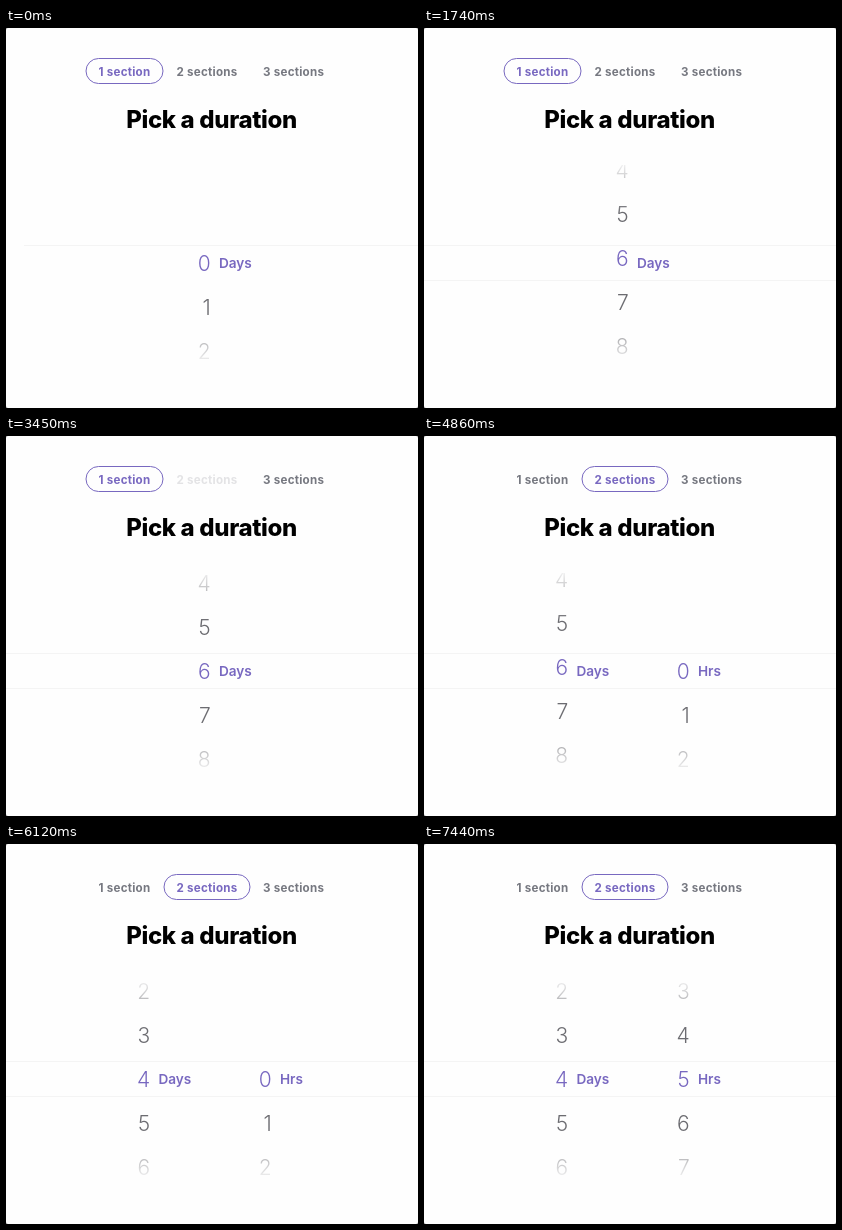
An HTML page with a canvas for the animation above (8000 ms loop, 412 by 380 pixels).

```html
<!DOCTYPE html>
<html lang="en">
<head>
<meta charset="utf-8">
<title>Duration picker</title>
<style>
html, body { margin: 0; width: 412px; height: 380px; overflow: hidden; background: #fefefe; }
canvas { display: block; width: 412px; height: 380px; }
</style>
</head>
<body>
<canvas id="stage"></canvas>
<script>
const W = 412, H = 380, LOOP = 8000;
const ROW = 44, MID = 235, REACH = 98, SOLID = 50, LAG = 60;
const PURPLE = '120,104,192', GRAY = '108,108,113';
const FONT = 'Inter, "Open Sans", sans-serif';
const PRESS = 3450, SWITCH = 3720;

const canvas = document.getElementById('stage');
const ctx = canvas.getContext('2d');
const dpr = window.devicePixelRatio || 1;
canvas.width = W * dpr;
canvas.height = H * dpr;

// Scroll positions in rows: [time, row]
const days = [[780, 0], [900, 0.75], [1050, 2.54], [1290, 5.3], [1530, 6.35], [1740, 6.11], [1950, 6.02], [2280, 6],
  [4830, 6], [5070, 8.6], [5220, 9.34], [5340, 9.2], [5610, 6.4], [5820, 4.5], [5970, 4.08], [6120, 4]];
const hours = [[6720, 0], [6840, 1.2], [6990, 3.7], [7140, 4.7], [7260, 4.7], [7350, 4.93], [7440, 5]];

const clamp = (v, a = 0, b = 1) => Math.min(b, Math.max(a, v));
const easeInOut = u => u < 0.5 ? 2 * u * u : 1 - 2 * (1 - u) * (1 - u);

// Smooth curve through the keys that never overshoots them
function curve(keys, t) {
  const last = keys.length - 1;
  if (t <= keys[0][0]) return keys[0][1];
  if (t >= keys[last][0]) return keys[last][1];
  const i = keys.findIndex(k => k[0] > t) - 1;
  const rate = j => (keys[j + 1][1] - keys[j][1]) / (keys[j + 1][0] - keys[j][0]);
  const slope = j => {
    if (j === 0 || j === last) return 0;
    const a = rate(j - 1), b = rate(j);
    return a * b <= 0 ? 0 : 2 * a * b / (a + b);
  };
  const [t0, p0] = keys[i], [t1, p1] = keys[i + 1];
  const d = t1 - t0, u = (t - t0) / d, v = 1 - u;
  return v * v * (1 + 2 * u) * p0 + u * u * (3 - 2 * u) * p1
    + d * u * v * (v * slope(i) - u * slope(i + 1));
}

function text(str, x, y, font, color, align = 'left', spacing = 0) {
  ctx.font = font + ' ' + FONT;
  ctx.letterSpacing = spacing + 'px';
  ctx.textAlign = align;
  ctx.fillStyle = color;
  ctx.fillText(str, x, y);
}

function faded(rgb) {
  const g = ctx.createLinearGradient(0, MID - REACH, 0, MID + REACH);
  const edge = (REACH - SOLID) / (2 * REACH);
  const stops = [[0, 0], [0, 0.1], [edge, 1], [1 - edge, 1], [1, 0.1], [1, 0]];
  stops.forEach(([at, a]) => g.addColorStop(at, `rgba(${rgb},${a})`));
  return g;
}

function wheel(right, label, keys, t) {
  const pos = curve(keys, t);
  const chosen = clamp(Math.round(curve(keys, t - LAG)), 0, 9);
  for (let n = 0; n < 10; n++) {
    const y = MID + (n - pos) * ROW;
    if (Math.abs(y - MID) > REACH + 10) continue;
    text(String(n), right, y + 7.8, '300 21px', faded(n === chosen ? PURPLE : GRAY), 'right');
  }
  text(label, right + 8.2, MID + 4.8, '600 13.6px', `rgb(${PURPLE})`);
}

function tab(label, x, width, active, alpha) {
  ctx.globalAlpha = alpha;
  if (active) {
    ctx.strokeStyle = `rgb(${PURPLE})`;
    ctx.lineWidth = 1;
    ctx.beginPath();
    ctx.roundRect(x - 12.5, 30.5, width, 25, 12.5);
    ctx.stroke();
  }
  text(label, x, 47.5, '700 11.6px', active ? `rgb(${PURPLE})` : '#767880', 'left', 0.25);
  ctx.globalAlpha = 1;
}

function draw(t) {
  ctx.setTransform(dpr, 0, 0, dpr, 0, 0);
  ctx.fillStyle = '#777';
  ctx.fillRect(0, 0, W, H);
  ctx.fillStyle = '#fefefe';
  ctx.beginPath();
  ctx.roundRect(0, 0, W, H, 2);
  ctx.fill();

  const two = t >= SWITCH;
  const pressed = t < PRESS ? 1 : 0.2 + 0.8 * easeInOut(clamp((t - SWITCH) / 250));
  tab('1 section', 92.5, 77, !two, 1);
  tab('2 sections', 170.5, 86, two, pressed);
  tab('3 sections', 257, 86, false, 1);
  text('Pick a duration', 205.5, 99.5, '800 24px', '#000', 'center', -0.35);

  const moved = t >= 810;
  ctx.fillStyle = '#f4f4f4';
  ctx.fillRect(moved ? 0 : 18, 217, W, 1);
  if (moved) ctx.fillRect(0, 252, W, 1);

  wheel(two ? 144.2 : 204.7, 'Days', days, t);
  if (two) wheel(265.7, 'Hrs', hours, t);
}

const start = performance.now();
function tick() {
  draw((performance.now() - start) % LOOP);
  requestAnimationFrame(tick);
}
tick();
</script>
</body>
</html>
```
